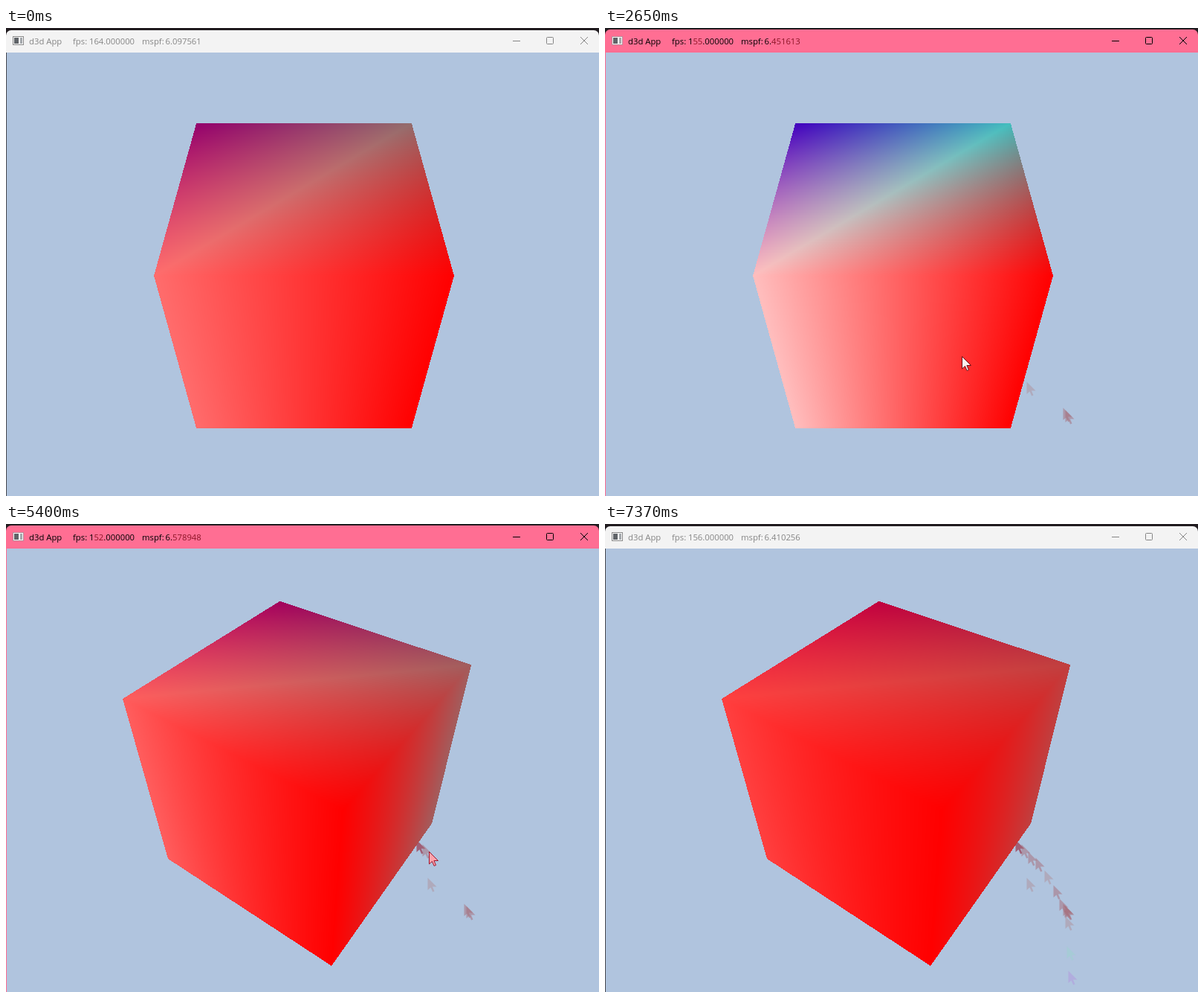
Recreate the animation shown at these times as an HTML page with a canvas. Size 798 by 629 pixels, loop 7.64 s.

```html
<!DOCTYPE html>
<html lang="en">
<head>
<meta charset="utf-8">
<title>d3d App</title>
<style>
html, body { margin: 0; width: 100%; height: 100%; overflow: hidden; }
canvas { display: block; }
</style>
</head>
<body>
<canvas id="stage" width="798" height="629"></canvas>
<script>
const W = 798, H = 629, LOOP = 7640;
const FOCUS = 820, BLUR = 7370, PRESS = 2950, RELEASE = 4600;
const ctx = document.getElementById('stage').getContext('2d');
const layer = document.createElement('canvas');
layer.width = W;
layer.height = H;
const layerCtx = layer.getContext('2d');
const image = layerCtx.createImageData(W, H);
const pixels = new Uint32Array(image.data.buffer);
const arrow = new Path2D('M0 0V16.5L4 13L6.6 19L9 18L6.4 12H12Z');

// Mouse path: time, x, y and, where the pointer leaves a smear, its colour
const smear = 'rgba(165,105,118,.5)', faint = 'rgba(175,150,160,.55)';
const path = [
  [190, 576, 604], [330, 590, 588], [470, 608, 551], [610, 619, 513],
  [2450, 619, 513, smear], [2510, 616, 510, smear], [2580, 567, 475, faint],
  [2650, 480, 441], [2820, 398, 399], [3000, 398, 399], [3410, 466, 404],
  [3550, 482, 405], [4050, 539, 405], [5200, 539, 405], [5270, 552, 424, 'rgba(150,30,50,.6)'],
  [5330, 560, 430, smear], [5400, 569, 440, smear], [5470, 579, 448, smear],
  [5530, 591, 465, faint], [5600, 603, 485, smear], [5660, 611, 503, smear],
  [5730, 618, 512, smear], [5765, 619, 527, faint],
  [5800, 621, 567, 'rgba(155,210,205,.5)'], [5870, 623, 600, 'rgba(178,165,222,.75)'],
  [5940, 624, 640]
];

const rates = [[0, 164], [2350, 155], [3350, 160], [4350, 152], [6350, 157], [7350, 156]];

// Faces are clockwise on screen and split along corners 0-2
const faces = [
  [[-1, 1, -1], [-1, 1, 1], [1, 1, 1], [1, 1, -1]],
  [[-1, -1, -1], [-1, 1, -1], [1, 1, -1], [1, -1, -1]],
  [[1, -1, -1], [1, 1, -1], [1, 1, 1], [1, -1, 1]]
];

function mouseAt(t) {
  const i = path.findIndex(p => p[0] > t);
  if (i < 0) return path[path.length - 1].slice(1, 3);
  if (!i) return null;
  const [t0, x0, y0] = path[i - 1], [t1, x1, y1] = path[i];
  const k = (t - t0) / (t1 - t0);
  return [x0 + (x1 - x0) * k, y0 + (y1 - y0) * k];
}

// Orbit camera at distance 5 with a 45 degree field of view
function camera(t) {
  const [mx, my] = mouseAt(Math.min(Math.max(t, PRESS), RELEASE));
  const deg = Math.PI / 180;
  const a = (mx - 398) / 4 * deg, phi = (45 + (my - 399) / 4) * deg;
  const sa = Math.sin(a), ca = Math.cos(a), sp = Math.sin(phi), cp = Math.cos(phi);
  const scale = 300 / Math.tan(22.5 * deg);
  return ([x, y, z]) => {
    const w = 5 - sp * sa * x - cp * y + sp * ca * z;
    return [
      401 + scale * (ca * x + sa * z) / w,
      333 - scale * (-cp * sa * x + sp * y + cp * ca * z) / w,
      w
    ];
  };
}

// White, red, blue or cyan by corner, pulsed towards red
function shade([x, , z], pulse) {
  const keep = 255 * (1 - pulse);
  const r = z < 0 ? 255 : 255 * pulse;
  const g = (x < 0) === (z < 0) ? keep : 0;
  const b = x > 0 && z < 0 ? 0 : keep;
  return [r, g, b];
}

function fillTriangle(A, B, C) {
  const [ax, ay] = A.p, [bx, by] = B.p, [cx, cy] = C.p;
  if ((bx - ax) * (cy - ay) - (by - ay) * (cx - ax) <= 0) return;
  const [ar, ag, ab] = A.c, [br, bg, bb] = B.c, [cr, cg, cb] = C.c;
  const x0 = Math.floor(Math.min(ax, bx, cx)), x1 = Math.ceil(Math.max(ax, bx, cx));
  const y0 = Math.floor(Math.min(ay, by, cy)), y1 = Math.ceil(Math.max(ay, by, cy));
  for (let y = y0; y < y1; y++) {
    for (let x = x0; x < x1; x++) {
      const px = x + .5, py = y + .5;
      let u = (cx - bx) * (py - by) - (cy - by) * (px - bx);
      let v = (ax - cx) * (py - cy) - (ay - cy) * (px - cx);
      let w = (bx - ax) * (py - ay) - (by - ay) * (px - ax);
      if (u < 0 || v < 0 || w < 0) continue;
      u /= A.p[2];
      v /= B.p[2];
      w /= C.p[2];
      const k = 1 / (u + v + w);
      const r = (u * ar + v * br + w * cr) * k + .5;
      const g = (u * ag + v * bg + w * cg) * k + .5;
      const b = (u * ab + v * bb + w * cb) * k + .5;
      pixels[y * W + x] = 0xff000000 | b << 16 | g << 8 | r;
    }
  }
}

function drawCube(t) {
  const clock = Math.min(Math.max(t, 900), BLUR) / 1000;
  const pulse = .5 - .5 * Math.cos(2 * (clock - 3.18));
  const project = camera(t);
  pixels.fill(0);
  for (const face of faces) {
    const [a, b, c, d] = face.map(v => ({ p: project(v), c: shade(v, pulse) }));
    fillTriangle(a, b, c);
    fillTriangle(a, c, d);
  }
  layerCtx.putImageData(image, 0, 0);
  ctx.drawImage(layer, 0, 0);
}

function rect(color, ...box) {
  ctx.fillStyle = color;
  ctx.fillRect(...box);
}

function text(s, x, color) {
  ctx.fillStyle = color;
  ctx.fillText(s, x, 22);
}

function drawWindow(t) {
  const active = t >= FOCUS && t < BLUR;
  const ink = active ? '#000' : '#858585';
  rect('#211c20', 0, 0, W, 33);
  ctx.fillStyle = active ? '#ff6e93' : '#f3f3f3';
  ctx.beginPath();
  ctx.roundRect(0, active ? 2 : 3, W, 40, [7, 7, 0, 0]);
  ctx.fill();
  rect('#b0c4de', 0, 33, W, H - 33);
  rect(active ? '#ff6e93' : '#4b4b50', 0, 33, 1, H - 33);

  // Program icon
  rect(active ? '#b98a98' : '#8a8a8a', 9, 11, 15, 12);
  rect('#f8f8f8', 10, 12, 13, 10);
  rect('#606468', 11, 13, 6, 8);
  rect('#a4a8ac', 19, 13, 3, 8);

  const fps = rates.filter(r => r[0] <= t).pop()[1];
  const rate = fps.toFixed(6), cost = Math.fround(1000 / fps).toFixed(6);
  const fresh = active && t >= rates[1][0] ? '#8c1426' : ink;
  ctx.font = '11.3px "Open Sans", "Noto Sans", sans-serif';
  text('d3d App', 31, ink);
  text('fps:', 90, ink);
  text(rate[0], 112, ink);
  text(rate.slice(1, 3), 118.4, fresh);
  text(rate.slice(3), 131.3, ink);
  text('mspf:', 183, ink);
  text(cost.slice(0, 2), 214.5, ink);
  text(cost.slice(2), 224, fresh);

  ctx.strokeStyle = ink;
  ctx.lineWidth = 1;
  ctx.beginPath();
  ctx.moveTo(682, 17.5);
  ctx.lineTo(692, 17.5);
  ctx.roundRect(727.5, 12.5, 9, 9, 1);
  ctx.moveTo(773, 12);
  ctx.lineTo(783, 22);
  ctx.moveTo(783, 12);
  ctx.lineTo(773, 22);
  ctx.stroke();
}

function pointer(x, y, fill, line) {
  ctx.save();
  ctx.translate(x + .5, y + .5);
  ctx.fillStyle = fill;
  ctx.fill(arrow);
  if (line) {
    ctx.strokeStyle = line;
    ctx.stroke(arrow);
  }
  ctx.restore();
}

function drawMouse(t) {
  const pos = mouseAt(t);
  if (!pos) return;
  const [x, y] = pos.map(Math.round);
  if (t >= PRESS && t < RELEASE) {
    ctx.fillStyle = '#ff6a0c';
    ctx.beginPath();
    ctx.arc(x, y, 12, 0, 7);
    ctx.fill();
  }
  if (t > 5200) pointer(x, y, '#ffa3ab', '#a0142c');
  else if (t > 2450) pointer(x, y, '#fff0ee', '#6a1018');
  else pointer(x, y, '#fff', '#000');
}

function draw() {
  const t = performance.now() % LOOP;
  drawWindow(t);
  for (const [at, x, y, color] of path) {
    if (color && t > at + 60) pointer(x, y, color);
  }
  drawCube(t);
  drawMouse(t);
  requestAnimationFrame(draw);
}
draw();
</script>
</body>
</html>
```
